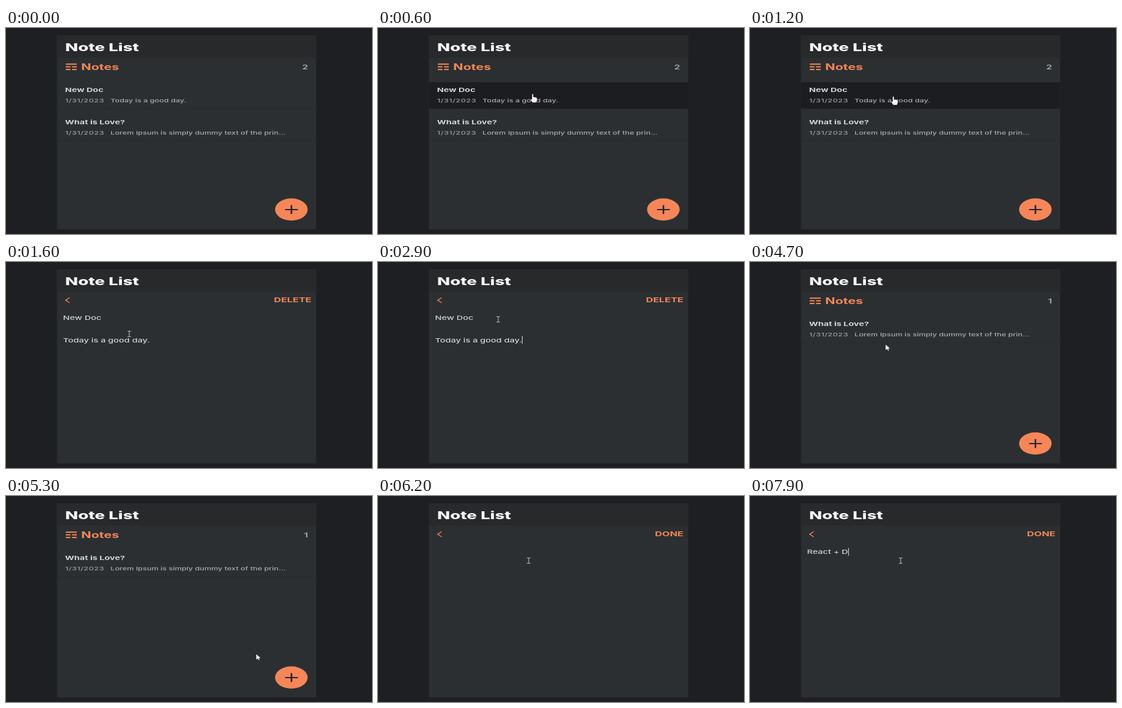
An HTML page that plays this animation: 600x338 px, repeating every 8 s.

```html
<!DOCTYPE html>
<html lang="en">
<head>
<meta charset="utf-8">
<title>Note List</title>
<style>
  html, body { margin: 0; width: 100%; height: 100%; overflow: hidden; background: #1e1f23; }
  svg { display: block; width: 100vw; height: 100vh; }
  text { font-family: Inter, "Open Sans", sans-serif; white-space: pre; }
</style>
</head>
<body>
<svg id="stage" viewBox="0 0 600 338" preserveAspectRatio="none"></svg>
<script>
const LOOP = 8000, STEP = 100;
const WIDE = 1.55; // the whole screen is shown wider than tall
const ORANGE = "#f68657", PALE = "#d6d4d4", GRAY = "#9c9fa1", DARK = "#1c1d21";
const stage = document.getElementById("stage");

function add(parent, tag, attrs = {}, content) {
  const el = document.createElementNS("http://www.w3.org/2000/svg", tag);
  for (const key in attrs) el.setAttribute(key, attrs[key]);
  if (content !== undefined) el.textContent = content;
  parent.appendChild(el);
  return el;
}
const group = (parent = stage) => add(parent, "g");
const rect = (parent, x, y, width, height, fill) =>
  add(parent, "rect", { x, y, width, height, fill });
const label = (parent, x, y, size, weight, fill, content, more = {}) =>
  add(parent, "text", {
    x: x / WIDE, y, fill, "font-size": size, "font-weight": weight,
    transform: `scale(${WIDE} 1)`, ...more
  }, content);
const show = (el, on) => el.setAttribute("visibility", on ? "inherit" : "hidden");

// Window
rect(stage, 0, 0, 600, 338, "#1e1f23");
rect(stage, 83.5, 12, 425, 318.5, "#2b2f32");
rect(stage, 83.5, 12, 425, 37, "#28292b");
label(stage, 97, 37.6, 17.85, 800, "#f5f6f7", "Note List");

// List view
const list = group();
const ROW_TOP = 89, ROW_H = 43.7, PITCH = 52.3;

function makeRow(title, date, body) {
  const row = group(list);
  const back = rect(row, 83.5, ROW_TOP, 425, ROW_H, DARK);
  rect(row, 83.5, ROW_TOP + ROW_H - .5, 425, 1, "#272b2d");
  label(row, 96.8, 105.4, 9.33, 700, PALE, title);
  label(row, 97, 122.3, 8.19, 500, GRAY, date, { "letter-spacing": .32 });
  label(row, 171.3, 122.3, 8.19, 500, "#a9abad", body);
  return { row, back };
}
const rows = [
  makeRow("New Doc", "1/31/2023", "Today is a good day."),
  makeRow("What is Love?", "1/31/2023", "Lorem Ipsum is simply dummy text of the prin...")
];

rect(list, 98, 58.3, 18, 2, ORANGE);
for (const y of [62.7, 67.1])
  for (const x of [98, 108.3]) rect(list, x, y, 7.7, 2, ORANGE);
label(list, 123.3, 68.8, 13.85, 700, ORANGE, "Notes");
const count = label(list, 495.2, 67.6, 10, 700, GRAY, "2", { "text-anchor": "end" });
add(list, "ellipse", { cx: 467.8, cy: 297.8, rx: 26.7, ry: 18.2, fill: ORANGE });
rect(list, 457.5, 297, 21, 1.9, "#1f2124");
rect(list, 466.7, 290.6, 2.5, 14.6, "#1f2124");

// Editor view
const editor = group();
add(editor, "path", {
  d: "M104.3 58.5 97.8 62.8 104.3 67", fill: "none", stroke: ORANGE, "stroke-width": 1.4
});
const action = label(editor, 500.7, 66.5, 10.5, 700, ORANGE, "", { "text-anchor": "end" });
const lines = [95.2, 131.7].map(y => label(editor, 93.5, y, 9.37, 500, PALE, ""));
const caret = rect(editor, 0, 0, 1, 12.5, "#e6e6e6");

// Pointers, each drawn around its hot spot
const pointers = {
  arrow: add(stage, "path", {
    d: "M0 .5V10.5L2.7 8.4 4.4 11.6 6.2 10.9 4.6 7.7H8.2Z",
    fill: "#fff", stroke: "#111", "stroke-width": .6
  }),
  hand: add(stage, "path", {
    d: "M-1.2 .8Q0-.8 1.2 .8V5L3.2 5.2 5.6 5.8 7.4 7V10.5L6 14.5H-.2L-3.4 9.8Q-3.6 7.8-1.2 9Z",
    fill: "#fff", stroke: "#111", "stroke-width": .6
  }),
  beam: add(stage, "path", {
    d: "M-2.8-4.5H-.7L0-4 .7-4.5H2.8M0-4V4M-2.8 4.5H-.7L0 4 .7 4.5H2.8",
    fill: "none", stroke: "#c8c9ca", "stroke-width": 1
  })
};

// time, x, y
const PATH = [
  [100, 292, 207], [300, 275, 162], [500, 258, 114], [600, 253.5, 108],
  [900, 243, 110], [1200, 235, 112], [1400, 235, 112], [1600, 202, 118],
  [2200, 198, 97], [2400, 198, 97], [2600, 197, 94], [2900, 197, 94],
  [3100, 270, 84], [3700, 465, 62], [4100, 465, 62], [4400, 340, 92],
  [4700, 222, 134.5], [4900, 250, 160], [5500, 466, 293], [5800, 466, 293],
  [6200, 247, 106]
];

function pointAt(t) {
  const next = PATH.findIndex(p => p[0] > t);
  if (next < 0) return PATH[PATH.length - 1].slice(1);
  const [t0, x0, y0] = PATH[next - 1], [t1, x1, y1] = PATH[next];
  const k = (t - t0) / (t1 - t0), e = k * k * (3 - 2 * k);
  return [x0 + (x1 - x0) * e, y0 + (y1 - y0) * e];
}

const TYPED = "React + D";
const KEYS = [6600, 6700, 6900, 7000, 7100, 7300, 7500, 7700, 7900];

function draw(t) {
  const inList = t < 1400 || (t >= 3900 && t < 5700);
  const isNew = t >= 5700, deleted = t >= 3900;
  const visible = t >= 100;
  const [x, y] = visible ? pointAt(t) : [0, 0];

  show(list, inList);
  show(editor, !inList);
  count.textContent = deleted ? "1" : "2";

  let overRow = false;
  rows.forEach(({ row, back }, i) => {
    const shift = (deleted ? i - 1 : i) * PITCH;
    const there = inList && (!deleted || i > 0);
    const top = ROW_TOP + shift;
    const hover = there && visible && y >= top && y < top + ROW_H;
    row.setAttribute("transform", `translate(0 ${shift})`);
    show(row, there);
    show(back, hover);
    overRow = overRow || hover;
  });

  action.textContent = isNew ? "DONE" : "DELETE";
  lines[0].textContent = isNew ? TYPED.slice(0, KEYS.filter(k => k <= t).length) : "New Doc";
  lines[1].textContent = isNew ? "" : "Today is a good day.";

  const line = lines[isNew ? 0 : 1];
  caret.setAttribute("x", 93.6 + line.getComputedTextLength() * WIDE);
  caret.setAttribute("y", isNew ? 85.3 : 121.7);
  const blink = t >= 1800 && (t - 1800) % 1000 < 500;
  show(caret, !inList && (isNew ? t >= 6500 : blink));

  const overButton = inList && Math.hypot((x - 467.8) / 26.7, (y - 297.8) / 18.2) < 1;
  const overAction = !inList && x > 438 && y > 56 && y < 69;
  const kind = overRow || overButton || overAction ? "hand"
    : !inList && y > 76 ? "beam" : "arrow";
  for (const name in pointers) {
    show(pointers[name], visible && name === kind);
    pointers[name].setAttribute("transform", `translate(${x} ${y})`);
  }
}

const start = performance.now();
function tick() {
  const t = (performance.now() - start) % LOOP;
  draw(Math.floor(t / STEP) * STEP);
  requestAnimationFrame(tick);
}
tick();
</script>
</body>
</html>
```
